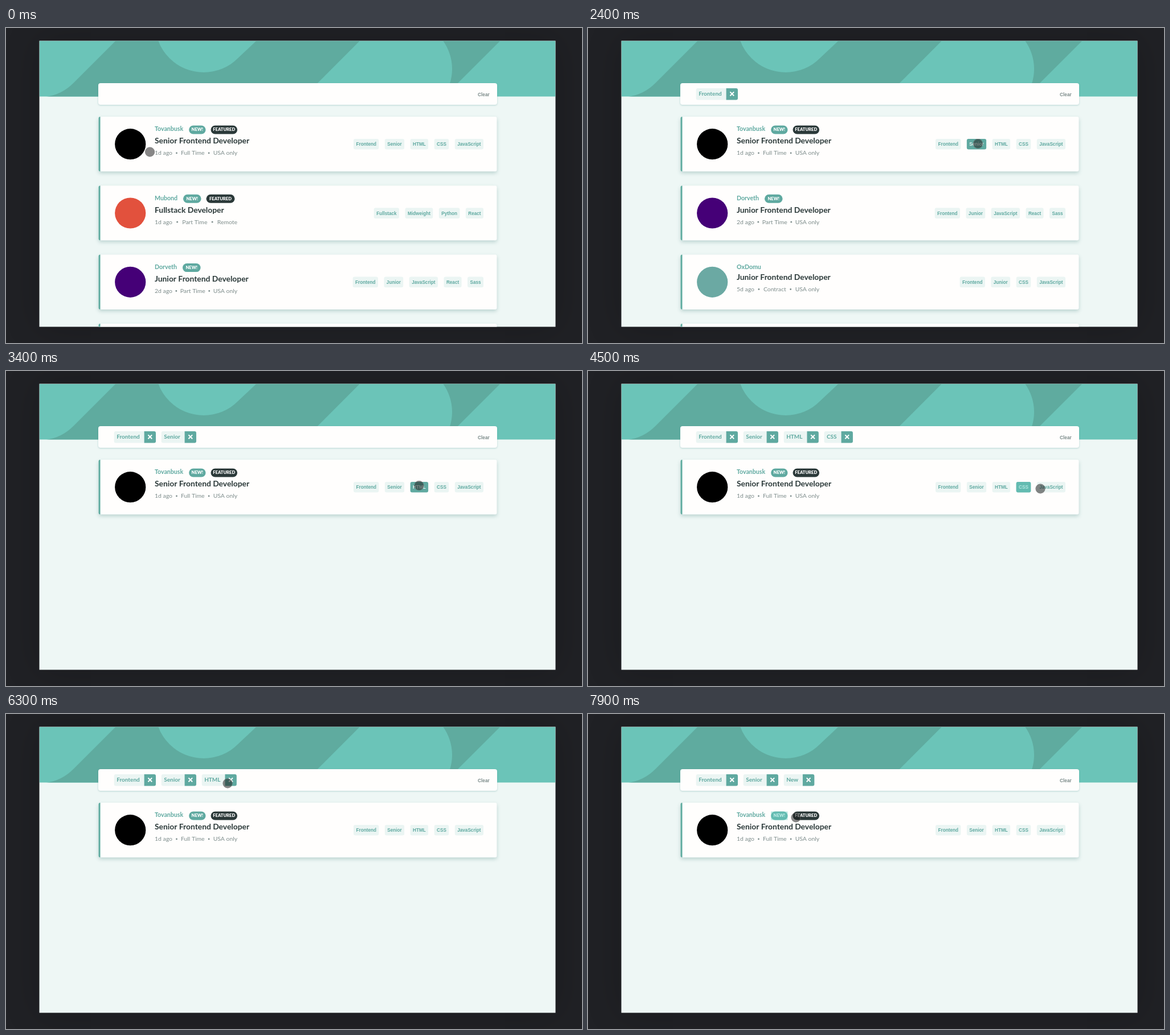
Recreate the animation shown at these times as an HTML page with a canvas. Size 1011 px wide and 554 px high, loop 8000 ms.

```html
<!DOCTYPE html>
<html lang="en">
<head>
<meta charset="utf-8">
<title>Job filter</title>
<style>
html, body { margin: 0; width: 100%; height: 100%; overflow: hidden; background: #202125; }
canvas { display: block; }
</style>
</head>
<body>
<canvas id="stage" width="1011" height="554"></canvas>
<script>
const ctx = document.getElementById('stage').getContext('2d');
const LOOP = 8000, STEP = 100, TAP_DELAY = 200;
const TEAL = '#5fa9a0', LIGHT = '#6bc4b8', BAND = '#5fab9f', DARK = '#2b3939';
const PAPER = '#fffefd', PALE = '#ebf5f3', PAGE = '#eef7f5', GREY = '#7d8c8b';
const GLOW = 'rgba(105,208,198,0.45)';
const SANS = '"Liberation Sans", Arial, sans-serif';
const ROUND = 'Lato, sans-serif';
const TAG_FONT = `bold 8.2px ${SANS}`;
const NAME_FONT = `bold 10.6px ${ROUND}`;
const META_FONT = `10.4px ${ROUND}`;
const BADGE_FONT = `900 7.6px ${ROUND}`;
const CHIP_FONT = `bold 10px ${ROUND}`;
const TEXT_X = 261, TEXT_W = 145;
const VIEW = [58.5, 22.5, 906, 503];

const jobs = [
  {
    name: 'Tovanbusk', title: 'Senior Frontend Developer', color: '#000',
    badges: ['NEW!', 'FEATURED'], meta: ['1d ago', 'Full Time', 'USA only'],
    tags: ['Frontend', 'Senior', 'HTML', 'CSS', 'JavaScript']
  },
  {
    name: 'Mubond', title: 'Fullstack Developer', color: '#e2513d',
    badges: ['NEW!', 'FEATURED'], meta: ['1d ago', 'Part Time', 'Remote'],
    tags: ['Fullstack', 'Midweight', 'Python', 'React']
  },
  {
    name: 'Dorveth', title: 'Junior Frontend Developer', color: '#450077',
    badges: ['NEW!'], meta: ['2d ago', 'Part Time', 'USA only'],
    tags: ['Frontend', 'Junior', 'JavaScript', 'React', 'Sass']
  },
  {
    name: 'OxDomu', title: 'Junior Frontend Developer', color: '#6ba9a3',
    badges: [], meta: ['5d ago', 'Contract', 'USA only'],
    tags: ['Frontend', 'Junior', 'CSS', 'JavaScript']
  },
  {
    name: 'Kelvast', title: 'Frontend Developer', color: '#333',
    badges: [], meta: ['1w ago', 'Full Time', 'Remote'],
    tags: ['Frontend', 'React']
  }
];

// Each touch hovers its target, then toggles the filter after TAP_DELAY
const touches = [
  { at: 1400, on: 'tag', label: 'Frontend' },
  { at: 2400, on: 'tag', label: 'Senior' },
  { at: 3400, on: 'tag', label: 'HTML' },
  { at: 4100, on: 'tag', label: 'CSS' },
  { at: 5500, on: 'chip', label: 'CSS' },
  { at: 6500, on: 'chip', label: 'HTML' },
  { at: 7600, on: 'badge', label: 'New' }
];

// Pointer glides: start, end, x, y
const glides = [
  [0, 0, 252.5, 218], [100, 200, 426, 160], [200, 300, 399, 184],
  [400, 500, 410, 194], [600, 1000, 637, 207], [1700, 2100, 684.5, 203.5],
  [2500, 2700, 694, 204], [2800, 3100, 725, 201.5], [3500, 3700, 778, 201.5],
  [4300, 4500, 794, 207], [4500, 4900, 785, 94.5], [4900, 5500, 454, 117],
  [5800, 6300, 389, 122], [6800, 7400, 338, 182], [7700, 7900, 365, 182]
];

const ease = u => u * u * (3 - 2 * u);

function pointerAt(t) {
  let x = 0, y = 0;
  for (const [from, to, tx, ty] of glides) {
    if (t < from) break;
    const k = t >= to ? 1 : ease((t - from) / (to - from));
    x += (tx - x) * k;
    y += (ty - y) * k;
  }
  return [x, y];
}

function stateAt(t) {
  const filters = new Set();
  let touch = {};
  for (const { at, on, label } of touches.filter(s => s.at <= t)) {
    const tapped = t >= at + TAP_DELAY;
    touch = { on, label, tapped };
    if (tapped && !filters.delete(label)) filters.add(label);
  }
  return { filters, touch };
}

function matches(job, filters) {
  return [...filters].every(f => job.tags.includes(f) || f === 'New' && job.badges.includes('NEW!'));
}

function box(x, y, w, h, r, fill) {
  ctx.beginPath();
  ctx.roundRect(x, y, w, h, r);
  ctx.fillStyle = fill;
  ctx.fill();
}

function disc(x, y, r, fill) {
  ctx.beginPath();
  ctx.arc(x, y, r, 0, Math.PI * 2);
  ctx.fillStyle = fill;
  ctx.fill();
}

function write(str, x, y, font, fill, align = 'left') {
  ctx.font = font;
  ctx.fillStyle = fill;
  ctx.textAlign = align;
  ctx.fillText(str, x, y);
}

function widthOf(str, font) {
  ctx.font = font;
  return ctx.measureText(str).width;
}

function shaded(color, blur, dy, draw) {
  ctx.save();
  ctx.shadowColor = color;
  ctx.shadowBlur = blur;
  ctx.shadowOffsetY = dy;
  draw();
  ctx.restore();
}

function drawHeader() {
  const R = 85, deg = Math.PI / 180, bottom = 120.5;
  const [left, top, width] = VIEW;
  ctx.save();
  ctx.beginPath();
  ctx.rect(left, top, width, bottom - top);
  ctx.clip();
  ctx.fillStyle = LIGHT;
  ctx.fillRect(left, top, width, 99);
  ctx.fillStyle = BAND;
  ctx.beginPath();
  ctx.moveTo(193, 22);
  ctx.arc(58, 37, R, 45 * deg, 82 * deg);
  ctx.lineTo(70, 121);
  ctx.lineTo(523, 121);
  ctx.lineTo(621.5, 22);
  ctx.lineTo(440, 22);
  ctx.arc(347, -7, R, 45 * deg, 160 * deg);
  ctx.fill();
  ctx.beginPath();
  ctx.arc(698, 72, R, -36 * deg, 36 * deg);
  ctx.lineTo(769, 121);
  ctx.lineTo(868, 22);
  ctx.fill();
  ctx.restore();
}

function drawCross(cx, cy, s) {
  ctx.strokeStyle = '#fff';
  ctx.lineWidth = 2;
  ctx.beginPath();
  for (const d of [-s, s]) {
    ctx.moveTo(cx - d, cy - s);
    ctx.lineTo(cx + d, cy + s);
  }
  ctx.stroke();
}

function drawSearch({ filters, touch }) {
  shaded('rgba(80,150,145,0.35)', 3, 1, () => box(162, 97, 700, 38, 4, PAPER));
  write('Clear', 828, 119.8, `bold 8.3px ${SANS}`, GREY);
  const side = 20.4;
  let x = 189.7;
  for (const label of filters) {
    const w = widthOf(label, CHIP_FONT) + 12.4;
    const hot = touch.on === 'chip' && touch.label === label;
    box(x, 106, w, side, [3, 0, 0, 3], PALE);
    write(label, x + 4.5, 119.3, CHIP_FONT, TEAL);
    box(x + w, 106, side, side, [0, 3, 3, 0], hot ? DARK : TEAL);
    drawCross(x + w + side / 2, 115.8, 3.4);
    x += w + side + 9.7;
  }
}

function drawBadges(job, y, touch) {
  const nameW = widthOf(job.name, NAME_FONT), gap = 9;
  const natural = job.badges.map(b => widthOf(b, BADGE_FONT) + 11);
  const total = natural.reduce((a, b) => a + b, 0);
  const shrink = Math.min(1, (TEXT_W - nameW - 2 * gap - 1) / total);
  let x = TEXT_X + nameW + gap + 1;
  job.badges.forEach((label, i) => {
    const w = natural[i] * shrink;
    box(x, y, w, 15, 7.5, i ? DARK : TEAL);
    write(label, x + w / 2, y + 9.9, BADGE_FONT, '#fff', 'center');
    if (!i && touch.on === 'badge' && touch.tapped) box(x, y, w, 15, 0, GLOW);
    x += w + gap;
  });
}

function drawMeta(meta, y) {
  const widths = meta.map(m => widthOf(m, META_FONT));
  const gap = (TEXT_W - widths.reduce((a, b) => a + b)) / (meta.length - 1);
  let x = TEXT_X;
  meta.forEach((m, i) => {
    if (i) disc(x - gap / 2, y - 3.3, 1.4, GREY);
    write(m, x, y, META_FONT, GREY);
    x += widths[i] + gap;
  });
}

function drawTags(labels, y, touch) {
  let right = 838;
  for (const label of [...labels].reverse()) {
    const w = widthOf(label, TAG_FONT) + 8.8, x = right - w;
    const hot = touch.on === 'tag' && touch.label === label;
    box(x, y, w, 18.6, 3, hot ? TEAL : PALE);
    write(label, x + 4.4, y + 12.3, TAG_FONT, hot ? '#eaf6f4' : TEAL);
    if (hot && touch.tapped) box(x, y, w, 18.6, 3, GLOW);
    right = x - 10.5;
  }
}

function drawCard(job, y, touch) {
  const lift = job.badges.length ? 0 : 3;
  shaded('rgba(70,130,125,0.3)', 6, 3, () => box(162.5, y, 699, 96.3, 3, PAPER));
  box(162.5, y, 3, 96.3, [3, 0, 0, 3], BAND);
  disc(218.2, y + 48.2, 27.1, job.color);
  write(job.name, TEXT_X, y + 25.2, NAME_FONT, TEAL);
  drawBadges(job, y + 15.5, touch);
  write(job.title, TEXT_X, y + 47.2 - lift, `bold 13.85px ${ROUND}`, DARK);
  drawMeta(job.meta, y + 67.2 - lift);
  drawTags(job.tags, y + 39, touch);
}

function drawPointer(x, y) {
  disc(x, y, 8.5, 'rgba(28,28,28,0.52)');
  ctx.beginPath();
  ctx.arc(x, y, 8, 0, Math.PI * 2);
  ctx.strokeStyle = 'rgba(128,128,128,0.5)';
  ctx.lineWidth = 1;
  ctx.stroke();
}

function render(t) {
  const state = stateAt(t);
  ctx.fillStyle = '#202125';
  ctx.fillRect(0, 0, 1011, 554);
  shaded('rgba(0,0,0,0.2)', 60, 0, () => box(...VIEW, 0, PAGE));
  ctx.save();
  ctx.beginPath();
  ctx.rect(...VIEW);
  ctx.clip();
  drawHeader();
  drawSearch(state);
  jobs.filter(job => matches(job, state.filters)).forEach((job, i) => {
    drawCard(job, 156 + i * 121.3, i ? {} : state.touch);
  });
  drawPointer(...pointerAt(t));
  ctx.restore();
}

const start = performance.now();
function tick() {
  const t = (performance.now() - start) % LOOP;
  render(Math.floor(t / STEP) * STEP);
  requestAnimationFrame(tick);
}
tick();
</script>
</body>
</html>
```
